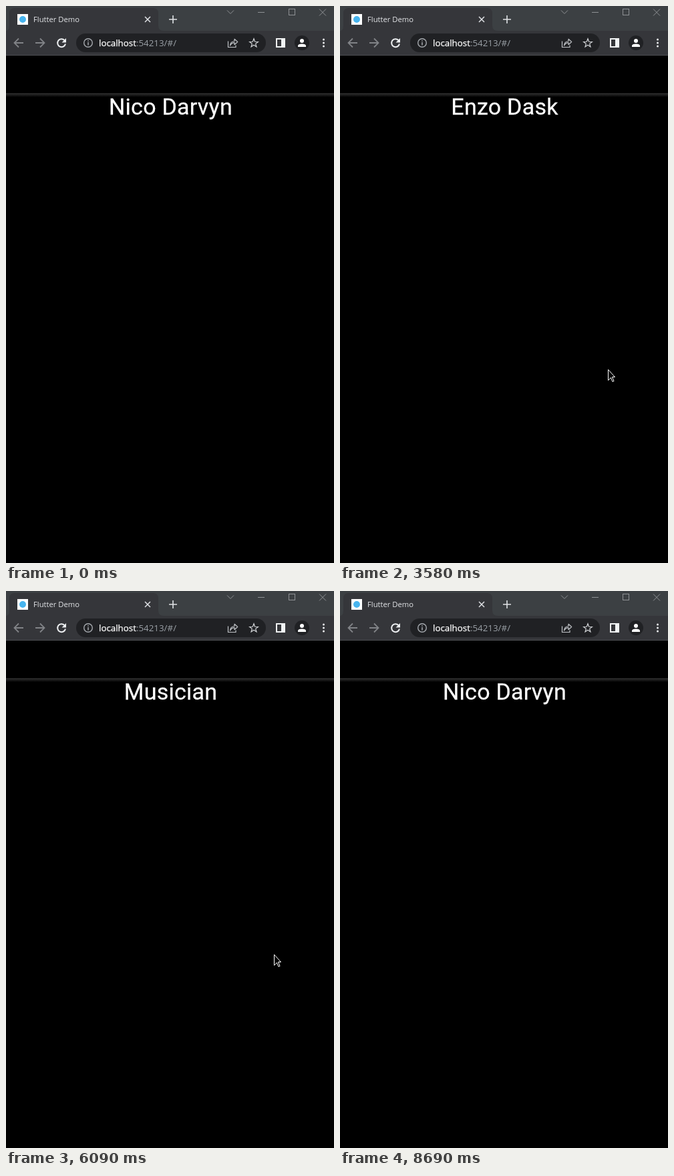
Animation, 491 px wide and 831 px high, one loop 9100 ms. Source, as an HTML page:

```html
<!DOCTYPE html>
<html lang="en">
<head>
<meta charset="utf-8">
<title>Flutter Demo</title>
<style>
html, body { margin: 0; width: 100%; height: 100%; overflow: hidden; background: #000; }
svg { display: block; }
.ui { font-family: "Open Sans", "Noto Sans", sans-serif; white-space: pre; }
.page { font: 34px Roboto, sans-serif; letter-spacing: .25px; fill: #fff; stroke: #fff; stroke-width: .3; text-anchor: middle; }
.line { fill: none; }
</style>
</head>
<body>
<svg width="491" height="831" viewBox="0 0 491 831">
  <defs>
    <linearGradient id="shade" x2="0" y2="1">
      <stop offset="0" stop-color="#2e2e2e"/>
      <stop offset=".4" stop-color="#1e1e1e"/>
      <stop offset="1" stop-color="#000"/>
    </linearGradient>
  </defs>
  <rect width="491" height="831"/>
  <rect y="130" width="491" height="6" fill="url(#shade)"/>

  <g id="pages">
    <text class="page" x="246.5" y="162">Nico Darvyn</text>
    <text class="page" x="737.5" y="162">Enzo Dask</text>
    <text class="page" x="1228.5" y="162">Musician</text>
  </g>

  <!-- tab strip -->
  <rect width="491" height="38" fill="#3c4043"/>
  <path d="M0 37Q5 37 5 30V11Q5 3 13 3H220Q228 3 228 11V29Q228 37 236 37Z" fill="#35363a"/>
  <rect x="17" y="12" width="16" height="16" fill="#fff"/>
  <circle cx="25" cy="20" r="5" fill="#47b4ee"/>
  <text class="ui" x="41" y="24" font-size="11.25" fill="#e4e6e9">Flutter Demo</text>
  <path class="line" d="M208 16l8 8m0-8l-8 8" stroke="#dfe1e5" stroke-width="1.5"/>
  <path class="line" d="M244 20h12M250 14v12" stroke="#dfe1e5" stroke-width="1.6"/>
  <g class="line" stroke="#8e9194">
    <path d="M331 6.5l5 5 5-5"/>
    <path d="M377 9.5h10"/>
    <rect x="423.5" y="4.5" width="9" height="9"/>
    <path d="M469 4.5l10 10m0-10l-10 10"/>
  </g>

  <!-- toolbar -->
  <rect y="37" width="491" height="37" fill="#35363a"/>
  <rect y="73" width="491" height="1" fill="#4c4d51"/>
  <g class="line" stroke="#818387" stroke-width="1.8">
    <path d="M26 55H13M19 48.5L12.5 55l6.5 6.5"/>
    <path d="M44 55h13M51 48.5l6.5 6.5-6.5 6.5"/>
  </g>
  <path class="line" d="M87.5 51A6 6 0 1 0 89 56.5" stroke="#eceef0" stroke-width="2"/>
  <path d="M90 48v6.5h-6.5z" fill="#eceef0"/>
  <rect x="105" y="41" width="284" height="28" rx="14" fill="#202124"/>
  <circle class="line" cx="123" cy="55" r="6.3" stroke="#a5a9ae" stroke-width="1.4"/>
  <path d="M122.25 54h1.5v4.5h-1.5zM122.25 51.3h1.5v1.5h-1.5z" fill="#a5a9ae"/>
  <text class="ui" x="139" y="60" font-size="13.35" fill="#fff"><tspan stroke="#fff" stroke-width=".25">localhost</tspan><tspan fill="#9aa0a6">:54213/#/</tspan></text>
  <g class="line" stroke="#c0c3c7" stroke-width="1.2">
    <path d="M332.5 52.5v9h11.5v-3"/>
    <path d="M335.5 59q.5-6 6.500-6.500v-3.200l4.700 4.200-4.700 4.200v-3q-4 0-6.500 4.300z" stroke-linejoin="round"/>
    <path id="star" stroke="#d5d7da"/>
  </g>
  <path d="M404 48h14v14h-14zM406 50v10h6v-10z" fill="#f1f3f4" fill-rule="evenodd"/>
  <circle cx="443" cy="55" r="11" fill="#202124"/>
  <circle cx="443" cy="52" r="3" fill="#fff"/>
  <path d="M437 61v-1.500q0-3 6-3t6 3V61z" fill="#fff"/>
  <g fill="#eceef0">
    <circle cx="475.5" cy="50" r="1.5"/>
    <circle cx="475.5" cy="55" r="1.5"/>
    <circle cx="475.5" cy="60" r="1.5"/>
  </g>

  <path id="cursor" d="M.5.5V16.5L4.5 12.500 7 18.500 9 17.500 6.500 11.500H10.500Z" stroke="#fff"/>
</svg>
<script>
const LOOP = 9100, PAGE = 491;
const pages = document.getElementById("pages");
const cursor = document.getElementById("cursor");

// five-pointed star
const points = Array.from({ length: 10 }, (_, i) => {
  const r = i % 2 ? 2.8 : 6.7, a = i * Math.PI / 5;
  return (371 + r * Math.sin(a)).toFixed(2) + " " + (55.5 - r * Math.cos(a)).toFixed(2);
});
document.getElementById("star").setAttribute("d", "M" + points.join("L") + "Z");

const linear = u => u;
const easeOut = u => 1 - (1 - u) ** 2;
const easeInOut = u => u * u * (3 - 2 * u);
// overdamped page snap, s in seconds
const snap = (u, s) => 1 - 1.7 * Math.exp(-9.07 * s) + 0.7 * Math.exp(-22 * s);

// start, end, from, to, easing of the scroll offset
const scroll = [
  [1280, 1700, 0, 136, linear],
  [1700, 2210, 136, 260, linear],
  [2210, 2970, 260, PAGE, snap],
  [4070, 4790, PAGE, PAGE + 212, linear],
  [4790, 5020, PAGE + 212, PAGE, snap],
  [5020, 5390, PAGE + 44, PAGE + 270, linear],
  [5390, 6090, PAGE + 270, 2 * PAGE, snap],
  [6530, 7090, 2 * PAGE, 720, linear],
  [7090, 7500, 720, PAGE, snap],
  [7500, 8020, PAGE + 10, 0, easeInOut]
];

function offset(t) {
  let x = 0;
  for (const [a, b, from, to, ease] of scroll) {
    if (t < a) break;
    x = t < b ? from + (to - from) * ease((t - a) / (b - a), (t - a) / 1000) : to;
  }
  return x;
}

// start, end, x0, y0, x1, y1, easing, stays visible afterwards
const moves = [
  [280, 720, 432, 818, 378, 590, easeOut, true],
  [3130, 3210, 378, 590, 491, 568, linear, false],
  [3420, 3580, 484, 550, 401, 542, easeOut, true],
  [8430, 8690, 401, 542, 447, 831, linear, false]
];

function pointer(t) {
  let at = null;
  for (const [a, b, x0, y0, x1, y1, ease, stays] of moves) {
    if (t < a) break;
    const u = ease(Math.min(1, (t - a) / (b - a)));
    at = u < 1 || stays ? [x0 + (x1 - x0) * u, y0 + (y1 - y0) * u] : null;
  }
  return at;
}

function draw(t) {
  pages.setAttribute("transform", `translate(${-offset(t).toFixed(2)} 0)`);
  const at = pointer(t);
  cursor.setAttribute("visibility", at ? "visible" : "hidden");
  if (at) cursor.setAttribute("transform", `translate(${at.map(Math.round).join(" ")})`);
}

const start = performance.now();
function tick() {
  draw((performance.now() - start) % LOOP);
  requestAnimationFrame(tick);
}
tick();
</script>
</body>
</html>
```
